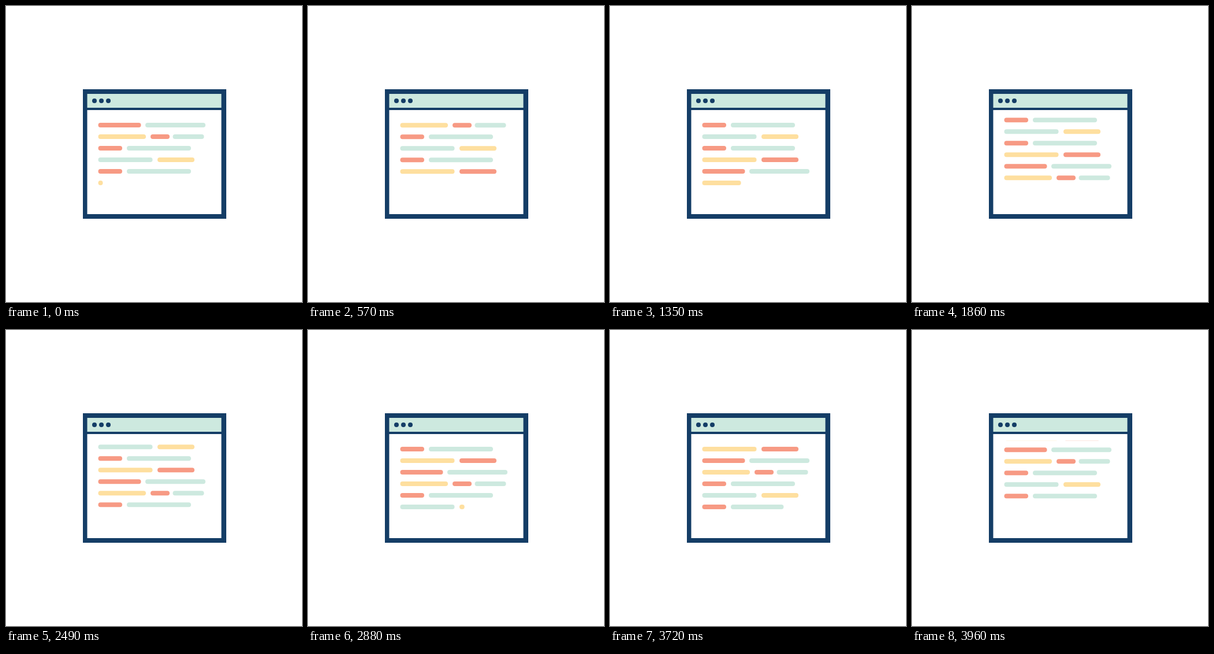
An HTML page that plays this animation: 512 px wide and 512 px high, repeating every 3990 ms.

```html
<!DOCTYPE html>
<html lang="en">
<head>
<meta charset="utf-8">
<title>Code window</title>
<style>
  html, body { margin: 0; width: 100%; height: 100%; overflow: hidden; background: #fff; }
  svg { display: block; width: 100%; height: 100%; }
  #code line { stroke-width: 8; stroke-linecap: round; }
  .coral { stroke: #f79a84; }
  .mint { stroke: #cde9df; }
  .yellow { stroke: #fedf9f; }
</style>
</head>
<body>
<svg viewBox="0 0 512 512">
  <defs>
    <clipPath id="page"><rect x="141" y="191" width="231" height="169"/></clipPath>
  </defs>
  <rect x="133" y="144" width="248" height="224" fill="#143d66"/>
  <rect x="140.5" y="152" width="232" height="24" fill="#cde9df"/>
  <rect x="140.5" y="180" width="232" height="180" fill="#fff"/>
  <g fill="#143d66">
    <circle cx="153" cy="164" r="4"/>
    <circle cx="165" cy="164" r="4"/>
    <circle cx="177" cy="164" r="4"/>
  </g>
  <g clip-path="url(#page)"><g id="code"></g></g>
</svg>
<script>
  const LOOP = 3990, SCROLL = 200, ROW = 20, TOP = 206, CAP = 4;

  // Each row: bars as [colour, left, right]
  const ROWS = [
    [['coral', 159.5, 233.5], ['mint', 241, 345]],
    [['yellow', 159.5, 242], ['coral', 250, 283], ['mint', 288.5, 342.5]],
    [['coral', 159.5, 201], ['mint', 209, 320]],
    [['mint', 159.5, 253.5], ['yellow', 262, 326]],
    [['coral', 159.5, 201], ['mint', 209, 320]],
    [['yellow', 159.5, 253.5], ['coral', 262, 326]]
  ];
  // A row is typed and scrolled up within each pair of neighbouring times
  const STOPS = [0, 586, 1222, 1969, 2635, 3296, LOOP];

  const code = document.getElementById('code');
  const clamp = v => Math.min(1, Math.max(0, v));
  const ease = v => v * v * (3 - 2 * v);

  function add(parent, name, attrs = {}) {
    const el = document.createElementNS('http://www.w3.org/2000/svg', name);
    for (const key in attrs) el.setAttribute(key, attrs[key]);
    return parent.appendChild(el);
  }

  const rows = ROWS.map(bars => {
    const group = add(code, 'g');
    const lines = bars.map(([colour, left, right]) => ({
      el: add(group, 'line', { class: colour, x1: left + CAP, y1: 0, y2: 0 }),
      from: left + CAP,
      to: right - CAP
    }));
    return { group, lines };
  });

  function typeRow(lines, progress) {
    lines.forEach(({ el, from, to }, i) => {
      const p = ease(clamp(progress * lines.length - i));
      el.setAttribute('x2', from + (to - from) * p);
      el.setAttribute('visibility', p > 0 ? 'visible' : 'hidden');
    });
  }

  function draw(t) {
    const step = STOPS.findIndex(stop => stop > t) - 1;
    const start = STOPS[step];
    const lift = STOPS[step + 1] - SCROLL;
    const shift = ROW * ease(clamp((t - lift) / SCROLL));
    const typed = clamp((t - start) / (lift - start));
    const last = rows.length - 1;

    rows.forEach(({ group, lines }, i) => {
      const place = (i - step + rows.length) % rows.length;
      group.setAttribute('transform', `translate(0 ${TOP + place * ROW - shift})`);
      typeRow(lines, place === last ? typed : 1);
    });
  }

  const origin = performance.now();
  function tick() {
    draw((performance.now() - origin) % LOOP);
    requestAnimationFrame(tick);
  }
  draw(0);
  requestAnimationFrame(tick);
</script>
</body>
</html>
```
